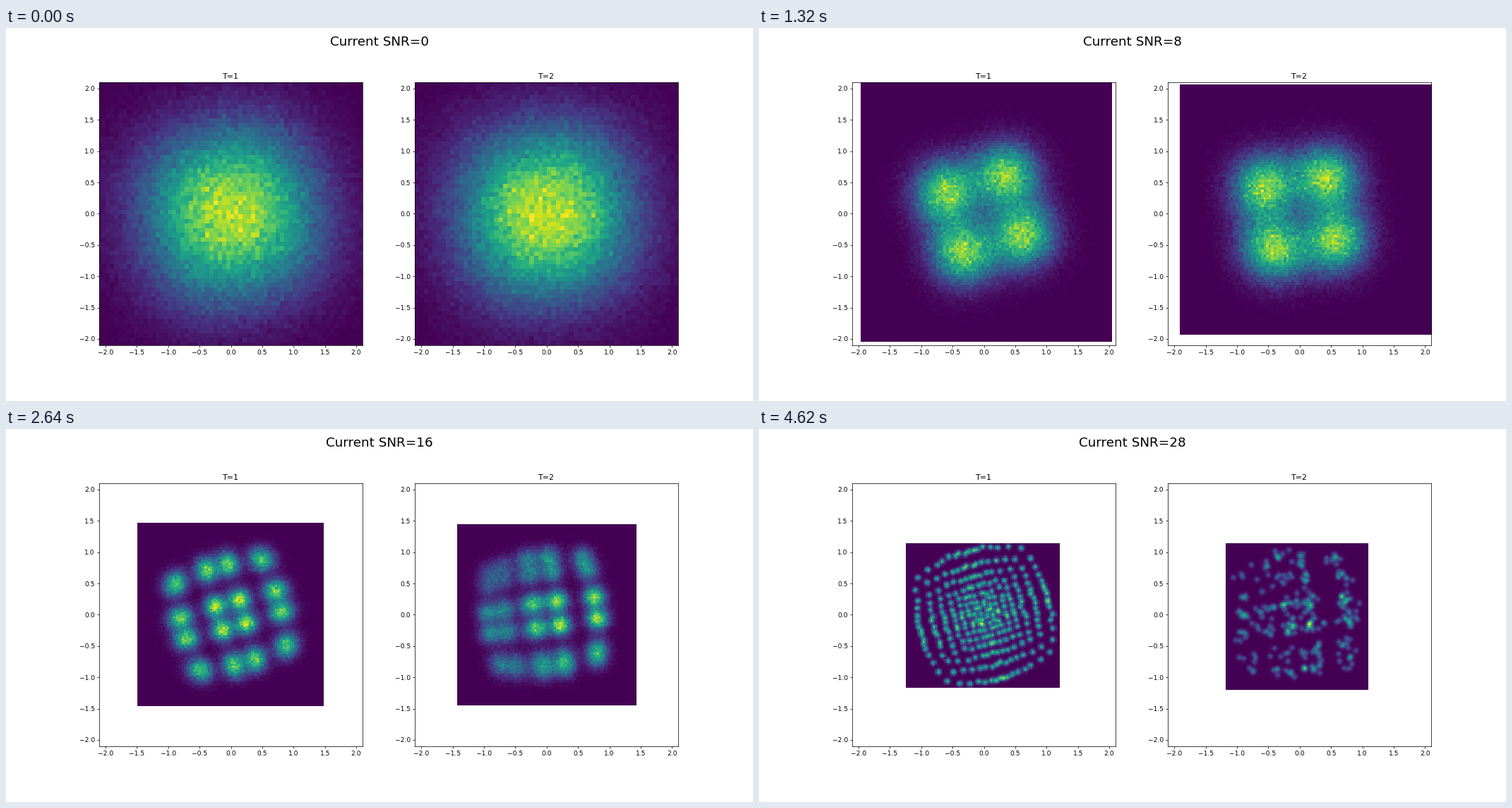
Recreate the animation shown at these times as a matplotlib script. Size 1058 by 529 pixels, loop 4950 ms.

```python
import numpy as np
import matplotlib.pyplot as plt
from matplotlib.animation import FuncAnimation

STEP_DB, FRAMES, INTERVAL = 2, 15, 330
SAMPLES, BINS, LIMIT = 256_000, 100, 2.1
TILT = (16, 8)

# Histogram edges (left, right, bottom, top) grow linearly with the noise
REACH = np.array([[-1.17, 1.11, -1.07, 1.03], [-1.10, .97, -1.12, 1.04]])
GROWTH = np.array([[-2.85, 3.28, -3.45, 3.90], [-2.90, 4.10, -2.90, 3.60]])

# How far each quarter of the second symbol's grid opens up, low to high
OPEN_U = np.repeat([1, 1, .2, .2], 4)
OPEN_V = np.repeat([.6, .2, .2, .9], 4)

JITTER = np.random.default_rng(7).normal(size=(2, 256, 2))


def smooth(value, start, end):
    t = np.clip((value - start) / (end - start), 0, 1)
    return t * t * (3 - 2 * t)


def group_mean(levels, size):
    return np.repeat(levels.reshape(-1, size).mean(axis=1), size)


STEPS = np.arange(16) - 7.5
FINE = .085 * STEPS + .00098 * STEPS**3
PAIRS, QUARTERS, HALVES = (group_mean(FINE, n) for n in (2, 4, 8))


def quarter_levels(snr):
    """Two levels at low SNR that part into four."""
    return HALVES + smooth(snr, 2, 13) * (QUARTERS - HALVES)


def lattice(u_levels, v_levels, degrees):
    """Rotated grid with its corners pulled in towards a disc."""
    u, v = (g.ravel() for g in np.meshgrid(u_levels, v_levels))
    x, y = u * np.sqrt(1 - .3 * v**2), v * np.sqrt(1 - .3 * u**2)
    c, s = np.cos(np.radians(degrees)), np.sin(np.radians(degrees))
    return np.column_stack([x * c - y * s, x * s + y * c])


def constellation(panel, snr):
    base = quarter_levels(snr)
    if panel == 0:
        u = v = base + smooth(snr, 10, 26) * (FINE - QUARTERS)
        scatter = .012 * smooth(snr, 12, 28)
    else:
        split = smooth(snr, 11, 19) * (PAIRS - QUARTERS)
        u, v = base + OPEN_U * split, base + OPEN_V * split
        scatter = .075 * np.clip((snr - 14) / 14, 0, 1)
    scale = 1.16 - .16 * snr / 28
    return lattice(scale * u, scale * v, TILT[panel]) + scatter * JITTER[panel]


def density(panel, snr):
    rng = np.random.default_rng(100 * panel + snr)
    sigma = np.sqrt(10 ** (-snr / 10) / 2)
    points = constellation(panel, snr)
    sent = points[rng.integers(len(points), size=SAMPLES)]
    x, y = (sent + sigma * rng.normal(size=sent.shape)).T
    extent = REACH[panel] + sigma * GROWTH[panel]
    counts, _, _ = np.histogram2d(x, y, BINS, range=[extent[:2], extent[2:]])
    return counts.T, extent


fig = plt.figure(figsize=(16, 8), dpi=66.125, facecolor="white")
title = fig.suptitle("", fontsize=20)
width = .775 / 2.2
images = []
for panel in range(2):
    ax = fig.add_axes([.125 + 1.2 * width * panel, .502 - width, width, 2 * width])
    ax.set_title(f"T={panel + 1}")
    images.append(ax.imshow(np.zeros((BINS, BINS)), cmap="viridis", origin="lower",
                            interpolation="nearest", aspect="auto"))
    ticks = np.arange(-2, 2.1, .5)
    ax.set(xlim=(-LIMIT, LIMIT), ylim=(-LIMIT, LIMIT), xticks=ticks, yticks=ticks)


def update(frame):
    snr = frame * STEP_DB
    title.set_text(f"Current SNR={snr}")
    for panel, image in enumerate(images):
        counts, extent = density(panel, snr)
        image.set_data(counts)
        image.set_extent(extent)
        image.set_clim(counts.min(), counts.max())
        image.axes.set(xlim=(-LIMIT, LIMIT), ylim=(-LIMIT, LIMIT))
    return [title, *images]


anim = FuncAnimation(fig, update, frames=FRAMES, interval=INTERVAL,
                     repeat=True, repeat_delay=0, blit=False)
plt.show()
```
